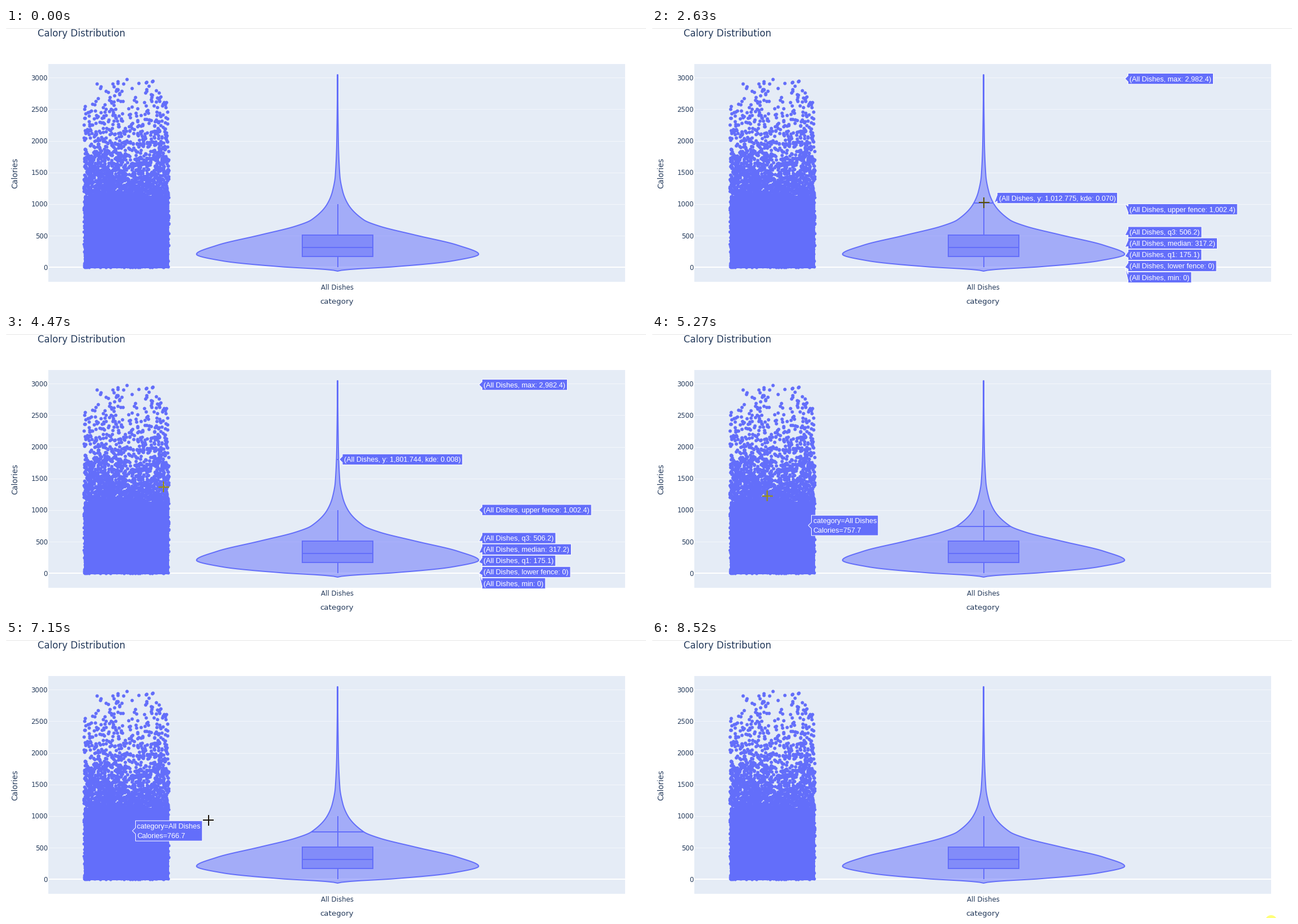
A matplotlib script that plays this animation: 1134x494 px, repeating every 8.65 s.

```python
import numpy as np
import matplotlib.pyplot as plt
from matplotlib.animation import FuncAnimation
from matplotlib.patches import Circle, Polygon, Rectangle

W, H, DPI = 1134, 494, 100
LOOP, STEP = 8650, 25
PT = 72 / DPI                       # points per pixel
BLUE, INK, PLOT_BG = "#636EFA", "#243A5B", "#E5ECF6"
FILL = (99 / 255, 110 / 255, 250 / 255, 0.5)
CX, ZERO, SCALE = 587.5, 425.3, 0.11237
LEFT, RIGHT, TOP, BOTTOM = 75, 1097, 64, 451

plt.rcParams["font.family"] = "DejaVu Sans"
fig = plt.figure(figsize=(W / DPI, H / DPI), dpi=DPI, facecolor="white")
ax = fig.add_axes([0, 0, 1, 1])
ax.set_xlim(0, W)
ax.set_ylim(H, 0)
ax.axis("off")


def to_y(value):
    return ZERO - value * SCALE


def to_value(y):
    return (ZERO - y) / SCALE


def line(xs, ys, color=BLUE, width=2.0, z=3):
    return ax.plot(xs, ys, color=color, lw=width * PT, zorder=z,
                   solid_capstyle="butt")[0]


def area(x, y, w, h, **style):
    return ax.add_patch(Rectangle((x, y), w, h, **style))


def write(x, y, text, size, **kw):
    ax.text(x, y, text, fontsize=size * PT, color=INK, **kw)


def monotone(xs, ys):
    """Cubic through the points that never overshoots; flat where it turns."""
    xs, ys = np.asarray(xs, float), np.asarray(ys, float)
    slope = np.diff(ys) / np.diff(xs)
    a, b = slope[:-1], slope[1:]
    same = a * b > 0
    m = np.zeros_like(ys)
    m[1:-1] = np.where(same, 2 * a * b / np.where(same, a + b, 1), 0)

    def curve(x):
        i = np.clip(np.searchsorted(xs, x, "right") - 1, 0, len(xs) - 2)
        h = xs[i + 1] - xs[i]
        u = np.clip((x - xs[i]) / h, 0, 1)
        ease = u * u * (3 - 2 * u)
        return (ys[i] * (1 - ease) + ys[i + 1] * ease
                + h * u * (1 - u) * ((1 - u) * m[i] - u * m[i + 1]))
    return curve


# --- Axes and titles ---
line([0, W], [0.5, 0.5], "#E6E6E6", 1)
plot_area = area(LEFT, TOP, RIGHT - LEFT, BOTTOM - TOP, fc=PLOT_BG, lw=0, zorder=0)
for tick in range(0, 3001, 500):
    y = to_y(tick)
    line([LEFT, RIGHT], [y, y], "#F3F6FB" if tick else "white", 1 if tick else 2, z=1)
    write(LEFT - 1, y + 4.4, str(tick), 11.8, ha="right")
write(56, 15.3, "Calory Distribution", 16.6)
write(CX, 465, "All Dishes", 11.7, ha="center")
write(586.3, 489.7, "category", 13.4, ha="center")
write(16.7, 257.5, "Calories", 13.5, ha="center", va="center", rotation=90)

# --- Strip of points: exponentially denser towards a solid block ---
rng = np.random.default_rng(7)
TAU, SOLID, FIRST = 62, 298, 90
lo, hi = np.exp(FIRST / TAU), np.exp(SOLID / TAU)
dot_y = np.r_[TAU * np.log(rng.uniform(lo, hi, 1630)), rng.uniform(SOLID, ZERO, 2500)]
spread = 75 * np.minimum(1, 0.65 + (dot_y - FIRST) / 140)
dot_x = 213 + spread * rng.uniform(-1, 1, dot_y.size)
ax.plot(dot_x, dot_y, "o", color=BLUE, ms=6 * PT, mew=0, zorder=2)
area(137.5, SOLID, 151.5, ZERO + 2 - SOLID, fc=BLUE, lw=0, zorder=2)
dense = area(136, SOLID - 36, 154, 166, fc="none", lw=0)

# --- Violin with its box ---
PROFILE = [(83, 0.3), (200, 1.4), (262, 4), (290, 9), (313, 18.5), (341, 46.5),
           (352, 74), (368, 138), (386, 213), (402, 250), (414, 203), (424.3, 100),
           (429, 22), (432, 0)]
half_width = monotone(*zip(*PROFILE))
level = np.linspace(PROFILE[0][0], PROFILE[-1][0], 240)
half = half_width(level)
violin = ax.add_patch(Polygon(
    np.c_[np.r_[CX + half, CX - half[::-1]], np.r_[level, level[::-1]]],
    fc=FILL, ec=BLUE, lw=2 * PT, joinstyle="round", zorder=3))
Q1, MEDIAN, Q3, FENCE = 175.1, 317.2, 506.2, 1002.4
box = area(525, to_y(Q3), 125, (Q3 - Q1) * SCALE, fc=FILL, ec=BLUE, lw=2 * PT, zorder=4)
line([525, 650], [to_y(MEDIAN)] * 2, z=4)
for start, end in ((FENCE, Q3), (Q1, 0)):
    line([CX, CX], [to_y(start), to_y(end)], z=4)

# --- Mouse: arrival time, pause, x, y ---
NEAREST = 2                         # a found point lies this far above the mouse
PATH = [
    (610, 0, 1036, 500), (1200, 0, 640, 419), (1390, 220, 589, to_y(9.278578)),
    (1755, 0, 589, 399), (2470, 160, 588, 310), (3300, 0, 586, to_y(1396.426)),
    (3870, 160, 586, 209), (4600, 0, 216, 300),
    (4870, 280, 277, to_y(757.7) + NEAREST), (5265, 0, 200.5, 282),
    (5700, 0, 215, 205), (6000, 0, 263, to_y(1649.8) + NEAREST),
    (6360, 0, 272, 275), (6900, 0, 224, to_y(766.7) + NEAREST),
    (7150, 0, 358.5, 320), (7350, 260, 763, 304), (8340, 0, 1085, 500)]
knots = [(t, x, y) for start, pause, x, y in PATH for t in sorted({start, start + pause})]
times, xs, ys = zip(*knots)
mouse_x, mouse_y = monotone(times, xs), monotone(times, ys)

# --- Hover labels ---
STATS = [("max", 2982.4), ("upper fence", FENCE), ("q3", Q3), ("median", MEDIAN),
         ("q1", Q1), ("lower fence", 0), ("min", 0)]
GAP, ARROW = 20.1, 5.5
PERIOD, LAG = 300, 100              # the chart answers the mouse slowly


class Label:
    widths = {}

    def __init__(self):
        self.body = ax.add_patch(Polygon([(0, 0), (1, 1), (0, 1)], fc=BLUE,
                                         ec="white", lw=PT, zorder=6))
        self.text = ax.text(0, 0, "", color="white", family="Liberation Sans",
                            fontsize=12.6 * PT, linespacing=1.48, zorder=7)

    def set_visible(self, visible):
        self.body.set_visible(visible)
        self.text.set_visible(visible)

    def show(self, text, x, tip_y, y):
        self.set_visible(True)
        self.text.set_text(text)
        if text not in self.widths:
            extent = self.text.get_window_extent()
            self.widths[text] = abs(extent.transformed(ax.transData.inverted()).width)
        two_lines = "\n" in text
        h = 18 if two_lines else 9.7
        left = x + ARROW
        right = left + self.widths[text] + 6
        self.body.set_xy([(x, tip_y), (left, y + ARROW), (left, y + h), (right, y + h),
                          (right, y - h), (left, y - h), (left, y - ARROW)])
        self.text.set_position((left + 3, y + (12.4 if two_lines else 4.5)))


labels = [Label() for _ in range(len(STATS) + 1)]
level_line = line([], [], z=5)


def spread_out(anchors):
    """Shift sorted positions so that neighbours keep at least GAP."""
    groups = []
    for i, anchor in enumerate(anchors):
        groups.append((anchor - i * GAP, 1))
        while len(groups) > 1 and groups[-2][0] > groups[-1][0]:
            (a, m), (b, n) = groups[-2:]
            groups[-2:] = [((a * m + b * n) / (m + n), m + n)]
    base = [mean for mean, n in groups for _ in range(n)]
    return [b + i * GAP for i, b in enumerate(base)]


def violin_labels(y):
    reach = half_width(y)
    items = [(to_y(v), CX + 250.5, f"(All Dishes, {name}: {v:,})") for name, v in STATS]
    items.append((y, CX + reach + 1,
                  f"(All Dishes, y: {to_value(y):,.7g}, kde: {reach * 0.00398:.3f})"))
    items.sort(key=lambda item: item[0])
    places = spread_out([item[0] for item in items])
    return [(text, x, tip, place) for (tip, x, text), place in zip(items, places)]


def point_label(x, y):
    tip = y - NEAREST
    text = f"category=All Dishes\nCalories={to_value(tip):,.1f}"
    return [(text, min(x, 277), tip, tip)]


def hover(t):
    """Level and labels for the mouse position that was handled last."""
    seen = max(t - LAG, 0) // PERIOD * PERIOD
    x, y = mouse_x(seen), mouse_y(seen)
    if seen < PATH[0][0] or y > level[-1] or x > CX + 250:
        return y, []
    return y, point_label(x, y) if x < 450 else violin_labels(y)


# The crosshair shows the inverse of whatever lies below it.
crosshair = []
for color, region in (("#1A1309", plot_area), ("#5B5207", violin),
                      ("#7C7206", box), ("#9C9105", dense)):
    arm = line([], [], color, z=10)
    arm.set_clip_path(region)
    crosshair.append(arm)
click = ax.add_patch(Circle((1097, 499.6), 10.6, fc="#FFFF78", lw=0, zorder=11))


def update(i):
    t = i * STEP
    y, items = hover(t)
    reach = half_width(y)
    level_line.set_data([CX - reach, CX + reach], [y, y])
    level_line.set_visible(bool(items))
    for label in labels:
        label.set_visible(False)
    for label, item in zip(labels, items):
        label.show(*item)

    mx, my = mouse_x(t), mouse_y(t)
    for arm in crosshair:
        arm.set_data([mx - 9.5, mx + 9.5, np.nan, mx, mx],
                     [my, my, np.nan, my - 9.5, my + 9.5])
        arm.set_visible(bool(my < BOTTOM))
    click.set_visible(t >= 8500)
    return []


anim = FuncAnimation(fig, update, frames=LOOP // STEP, interval=STEP,
                     init_func=lambda: [], repeat=True, repeat_delay=0)
plt.show()
```
